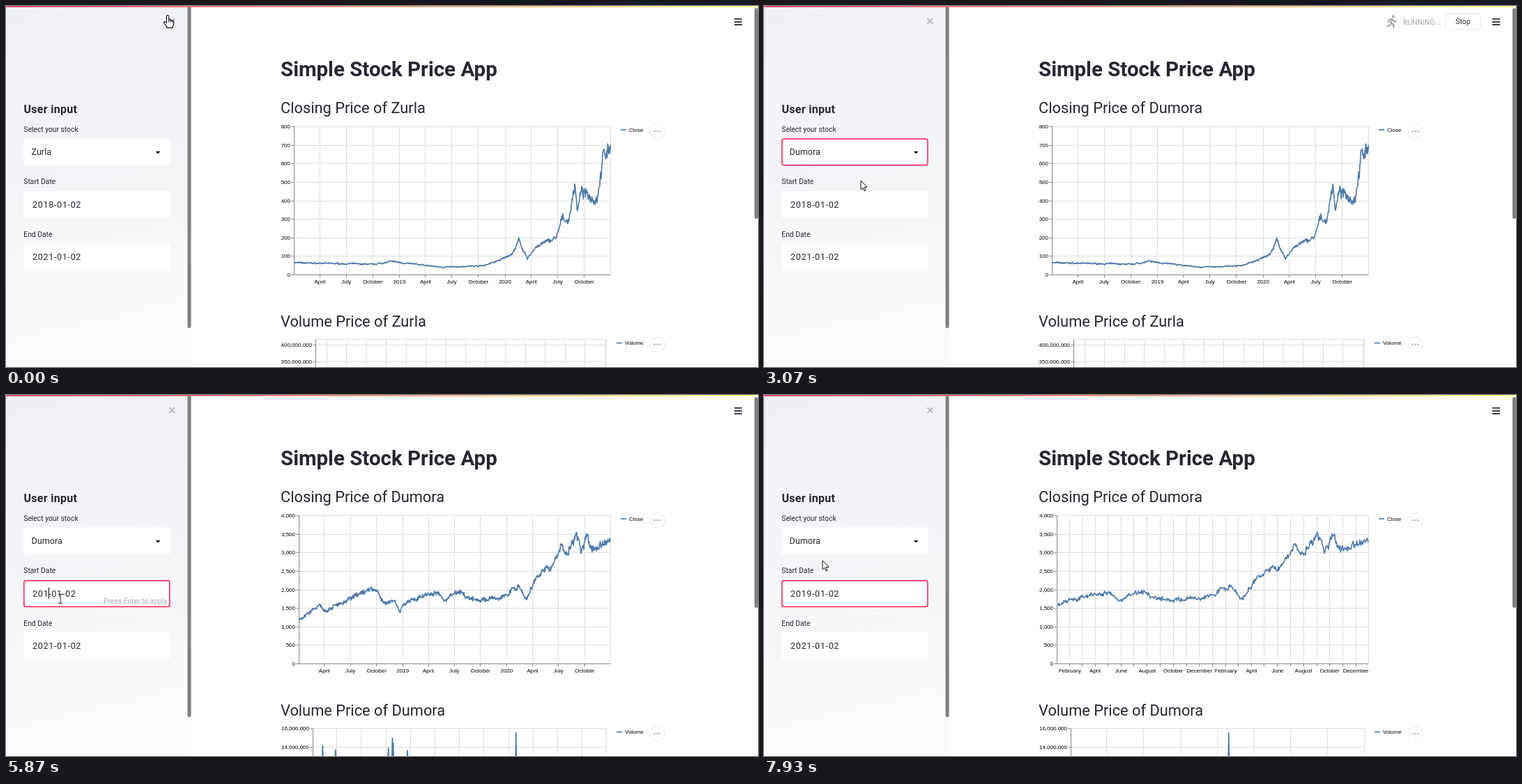
Animation of 1079x519 px, one loop 8 s. Source, as an HTML page:

```html
<!DOCTYPE html>
<html lang="en">
<head>
<meta charset="utf-8">
<title>Simple Stock Price App</title>
<style>
  html, body { margin: 0; width: 100%; height: 100%; overflow: hidden; background: #fff; }
  svg { display: block; width: 1079px; height: 519px; }
  text { font-family: Roboto, "Noto Sans", sans-serif; fill: #262730; white-space: pre; }
  .h1 { font-size: 29.5px; font-weight: 700; }
  .h2 { font-size: 21.8px; }
  .side { font-size: 16px; font-weight: 700; letter-spacing: .3px; }
  .label { font-size: 10.3px; }
  .value { font-size: 12.6px; }
  .date { font-size: 12.6px; letter-spacing: .65px; }
  .item { font-size: 12.6px; fill: #8b8c92; }
  .hint { font-size: 10.25px; fill: #a6aab5; }
  .axis { font: 8px "Liberation Sans", Arial, sans-serif; fill: #000; }
  .grid { stroke: #ddd; fill: none; }
  .rule { stroke: #888; fill: none; }
  .line { stroke: #4c78a8; fill: none; stroke-width: 1.6; stroke-linejoin: round; }
  .focus { stroke: #f63366; fill: none; stroke-width: 1.7; }
  .sport { stroke: #a3a4a8; fill: none; stroke-width: 2.1; stroke-linecap: round; stroke-linejoin: round; }
  .sport circle { fill: #a3a4a8; stroke: none; }
</style>
</head>
<body>
<svg viewBox="0 0 1079 519" xmlns="http://www.w3.org/2000/svg">
  <defs>
    <linearGradient id="sideFill" x2="0.12" y2="1">
      <stop stop-color="#eef0f5"/><stop offset="1" stop-color="#fbfbfb"/>
    </linearGradient>
    <linearGradient id="topFill"><stop stop-color="#f63366"/><stop offset="1" stop-color="#fffd80"/></linearGradient>
    <filter id="shadow" x="-10%" y="-10%" width="120%" height="125%">
      <feDropShadow dx="0" dy="2.5" stdDeviation="3.5" flood-color="#000" flood-opacity=".2"/>
    </filter>
  </defs>

  <rect width="1079" height="519" fill="#fff"/>
  <rect width="265.5" height="519" fill="url(#sideFill)"/>
  <rect x="260.5" y="-4" width="5" height="467" rx="2.5" fill="#7f7f80"/>
  <rect x="1074" y="3" width="5" height="303" rx="2.5" fill="#7f7f80"/>
  <rect width="1079" height="1.7" fill="url(#topFill)"/>
  <path d="M234.4 18l7.8 7.8m0-7.8l-7.8 7.8" stroke="#b9bbc1" stroke-width="2.1"/>
  <path d="M1045 18.7h11M1045 22.8h11M1045 26.9h11" stroke="#262730" stroke-width="1.7"/>

  <text class="side" x="25.5" y="154">User input</text>
  <text class="label" x="25.3" y="181">Select your stock</text>
  <text class="label" x="25.3" y="256">Start Date</text>
  <text class="label" x="25.3" y="332">End Date</text>
  <g fill="#fff">
    <rect x="25" y="190.3" width="210.5" height="39" rx="3"/>
    <rect x="25" y="266" width="210.5" height="39" rx="3"/>
    <rect x="25" y="341.3" width="210.5" height="39" rx="3"/>
  </g>
  <rect id="pickFocus" class="focus" x="25.8" y="191.2" width="209" height="37.6" rx="3"/>
  <rect id="dateFocus" class="focus" x="25.8" y="266.8" width="209" height="37.6" rx="3"/>
  <path d="M214.8 209h6.4l-3.2 3.4z" fill="#000"/>
  <text id="pick" class="value" x="36.5" y="214"></text>
  <text id="start" class="date" x="38" y="290"></text>
  <text class="date" x="38" y="365">2021-01-02</text>
  <text id="hint" class="hint" x="231" y="300" text-anchor="end">Press Enter to apply</text>
  <rect id="caret" width="1" height="16" fill="#000"/>

  <text class="h1" x="394" y="101">Simple Stock Price App</text>
  <text id="closeHead" class="h2" x="394" y="154"></text>
  <text id="volumeHead" class="h2" x="394" y="461"></text>
  <g id="closeCharts"></g>
  <g id="volumeCharts"></g>

  <g id="running">
    <g id="runner" class="sport">
      <circle cx="903" cy="15" r="2.1"/>
      <path d="M901 18.5l-1.6 6 3.6 2 .6 4.4M899.5 25l-1.7 3-3.6 1.2M901 18.6l-4 1.4-1.2 3M902 19.5l1.8 2.4 3 .6"/>
    </g>
    <g id="swimmer" class="sport">
      <circle cx="906" cy="19.3" r="2.1"/>
      <path d="M894.5 15.2l5-.3 4.5 7.2M899.5 18.6l-4 3.8"/>
      <path d="M892.8 25.2q2.7-2 5.4 0t5.4 0 5.4 0M892.8 29q2.7-2 5.4 0t5.4 0 5.4 0" stroke-width="1.6"/>
    </g>
    <text x="917" y="27" font-size="10.4" style="fill:#a3a4a8">RUNNING...</text>
    <rect x="978" y="10.5" width="50" height="23.5" rx="3" fill="#fff" stroke="#e4e5ea"/>
    <text x="1003" y="26" font-size="10.5" text-anchor="middle">Stop</text>
  </g>

  <g id="menu">
    <rect x="25" y="229" width="210.5" height="139" rx="2" fill="#fff" filter="url(#shadow)"/>
  </g>

  <g id="cursor">
    <path id="hand" fill="#fff" stroke="#111" stroke-width="1.1" stroke-linejoin="round"
      d="M-1.6 1.4Q0-.8 1.6 1.4V7Q3.3 5.9 4.2 7.4 5.6 6.5 6.6 8 8.4 7.4 8.7 9.4V13.2L7.2 16.4V18.4H-1.4V16.6L-5.4 11.4Q-6 9.4-4.1 9.3L-1.6 11.6ZM1.6 7v3M4.2 7.6v2.6M6.6 8.2v2.4"/>
    <path id="arrow" fill="#fff" stroke="#111" stroke-linejoin="round" d="M0 0V13L3 10.2 5 15 7 14.1 5 9.4H9Z"/>
    <path id="beam" fill="none" stroke="#222" d="M-3-6.5h2L0-5.8 1-6.5h2M0-5.8V5.8M-3 6.5h2L0 5.8 1 6.5h2"/>
  </g>
</svg>
<script>
const $ = id => document.getElementById(id);
const clamp = v => Math.max(0, Math.min(1, v));
const FIRST = "Zurla", SECOND = "Dumora";
const DAYS = 1094, RIGHT = 867.5, BASE = 386.5, TOP = 173.5;
const DAY_MS = 864e5, ORIGIN = Date.UTC(2018, 0, 2);

function random(seed) {
  return () => (seed = (seed * 16807) % 2147483647) / 2147483647;
}

// Trading days drift between key points [x on the three-year chart, price] with seeded jitter.
function prices(x0, noise, seed, keys) {
  const rnd = random(seed), out = [];
  let i = 0, drift = 0;
  for (let day = 0; day <= DAYS; day += 1.447) {
    const x = x0 + day / DAYS * (RIGHT - x0);
    while (i < keys.length - 2 && keys[i + 1][0] <= x) i++;
    const [[xa, va], [xb, vb]] = [keys[i], keys[i + 1]];
    const shock = (rnd() + rnd() - 1) * noise;
    drift = drift * .8 + shock * .6;
    out.push([day, (va + (vb - va) * (x - xa) / (xb - xa)) * (1 + drift + shock)]);
  }
  return out;
}

const firstPrices = prices(413.5, .05, 7, [
  [413.5, 65], [527, 57], [553, 72], [626, 41], [685, 50], [712, 84], [727, 116], [736, 185], [748, 85], [760, 150],
  [790, 203], [799, 315], [807, 280], [816.5, 495], [820, 350], [825, 440], [848, 410], [857, 640], [867.5, 700]]);
const secondPrices = prices(420.5, .028, 21, [
  [420.5, 1190], [451, 1590], [457, 1410], [519, 2010], [531, 1990], [541, 1680], [558, 1690], [565, 1400], [574, 1660],
  [619, 1930], [631, 1730], [649, 2000], [662, 1790], [708, 1750], [736, 2140], [747, 1720], [761, 2370], [785, 2650],
  [795, 3130], [806, 3030], [818.5, 3500], [825, 3000], [833.5, 3380], [843, 3080], [867.5, 3300]]);

const path = (cls, d) => `<path class="${cls}" d="${d}"/>`;
const label = (x, y, s, anchor = "start") => `<text class="axis" x="${x}" y="${y}" text-anchor="${anchor}">${s}</text>`;
const half = v => Math.floor(v) + .5;

function legend(x, y, name) {
  const dots = [-4, 0, 4].map(d => `<circle cx="${934.5 + d}" cy="${y + 2.2}" r="1.4" fill="#c0c0c0"/>`).join("");
  return path("line", `M${x} ${y}h8`) + label(x + 12, y + 2.5, name) +
    `<circle cx="934.5" cy="${y + 2.2}" r="10.6" fill="#fff" stroke="#e8e8e8"/>` + dots;
}

// First days of months inside the range, every `step` months.
function monthStarts(from, step) {
  const list = [];
  for (let m = step; ; m += step) {
    const date = new Date(Date.UTC(2018, m, 1)), day = (date - ORIGIN) / DAY_MS;
    if (day > DAYS) return list;
    if (day > from) list.push({ day, date });
  }
}

function monthName(date, step) {
  const month = date.getUTCMonth();
  if (step === 1 && month % 2 === 0) return "";
  return month ? date.toLocaleString("en-US", { month: "long", timeZone: "UTC" }) : date.getUTCFullYear();
}

function closeChart(series, x0, gap, from, step) {
  const px = day => x0 + (day - from) / (DAYS - from) * (RIGHT - x0);
  const py = v => BASE - v / (8 * gap) * (BASE - TOP);
  let grid = `M${x0} ${TOP}H${RIGHT}V${BASE}`, ticks = `M${x0} ${TOP}V${BASE}H${RIGHT}`, text = "";
  for (let v = 0; v <= 8 * gap; v += gap) {
    const y = half(py(v));
    grid += `M${x0} ${y}H${RIGHT}`;
    ticks += `M${x0} ${y}h-4`;
    text += label(x0 - 5.5, y + 2.8, v.toLocaleString("en-US"), "end");
  }
  for (const { day, date } of monthStarts(from, step)) {
    const x = half(px(day));
    grid += `M${x} ${TOP}V${BASE}`;
    ticks += `M${x} ${BASE}v4`;
    text += label(px(day), 399, monthName(date, step), "middle");
  }
  const curve = series.filter(p => p[0] >= from).map(([d, v]) => px(d).toFixed(1) + " " + py(v).toFixed(1)).join("L");
  return `<g>${path("grid", grid)}${path("rule", ticks)}${text}${path("line", "M" + curve)}${legend(882, 178, "Close")}</g>`;
}

function volumeChart(x0, top, gap, rows, columns, peaks) {
  let grid = `M${x0} 519V479.5H861.5V519`, ticks = `M${x0} 479.5V519`, text = "";
  rows.forEach((name, i) => {
    const y = half(top + i * gap);
    grid += `M${x0} ${y}H861.5`;
    ticks += `M${x0} ${y}h-4`;
    text += label(x0 - 5.5, y + 2.8, name, "end");
  });
  for (const x of columns) grid += `M${half(x)} 479.5V519`;
  const bars = peaks.map(([x, y]) => `M${x - .6} 522L${x} ${y}L${x + .6} 522`).join("");
  return `<g>${path("grid", grid)}${path("rule", ticks)}${text}${path("line", bars)}${legend(876, 484.5, "Volume")}</g>`;
}

function secondVolume(from) {
  const px = day => 440.5 + (day - from) / (DAYS - from) * 421;
  const peaks = [[36, 504], [84, 510], [281, 507], [296, 493], [299, 500], [352, 511], [757, 485.5]];
  return volumeChart(440.5, 479, 27, ["16,000,000", "14,000,000"],
    monthStarts(from, 3).map(m => px(m.day)),
    peaks.filter(p => p[0] > from).map(([d, y]) => [px(d), y]));
}

$("closeCharts").innerHTML = closeChart(firstPrices, 413.5, 100, 0, 3) +
  closeChart(secondPrices, 420.5, 500, 0, 3) + closeChart(secondPrices, 420.5, 500, 365, 1);
$("volumeCharts").innerHTML =
  volumeChart(444.5, 487, 24.5, ["400,000,000", "350,000,000"], Array.from({ length: 15 }, (_, i) => 460 + i * 28.5), []) +
  secondVolume(0) + secondVolume(365);
$("menu").innerHTML += [SECOND, "Bondeo", "Nedvo", FIRST]
  .map((s, i) => `<text class="item" x="38" y="${256 + i * 31.6}">${s}</text>`).join("");

// Time is counted in ticks, 15 per second.
const TICKS = 120;
const AT = { open: 20, choose: 44, rerun: 46, close1: 61, volume1: 63, done1: 65,
  focus: 72, erase: 88, retype: 94, enter: 102, close2: 107, volume2: 112, done2: 118 };

// Each leg eases the pointer to a place: start, end, x, y, shape.
const LEGS = [
  [0, 0, 232, 13, "hand"], [3, 10, 381, 118, "arrow"], [10, 14, 205, 208, "arrow"], [14, 16, 214, 212, "hand"],
  [21, 30, 139, 251, "hand"], [AT.choose, AT.choose, 139, 251, "arrow"], [52, 55, 142, 270, "beam"],
  [59, 66, 68, 285, "beam"], [73, 77, 78, 293, "beam"], [114, 119, 84, 238, "arrow"]];

const show = (el, on) => { el.style.display = on ? "" : "none"; };
const fade = (el, v) => { el.style.opacity = v; };
const write = (id, s) => { if ($(id).textContent !== s) $(id).textContent = s; };
const pickOne = (id, n) => [...$(id).children].forEach((el, i) => show(el, i === n));
const phase = (k, a, b) => k < a ? 0 : k < b ? 1 : 2;
const stale = (k, from) => 1 - .67 * clamp((k - from) / 15) ** 2;

function moveCursor(k) {
  const i = LEGS.findLastIndex(leg => k >= leg[0]);
  const [a, b, x, y, shape] = LEGS[i], [, , x1, y1] = LEGS[Math.max(0, i - 1)];
  const p = b > a ? clamp((k - a) / (b - a)) : 1, e = p * p * (3 - 2 * p);
  $("cursor").setAttribute("transform", `translate(${x1 + (x - x1) * e} ${y1 + (y - y1) * e})`);
  for (const id of ["hand", "arrow", "beam"]) show($(id), id === shape);
}

// The text caret blinks every 8 ticks and restarts with each edit.
function moveCaret(k) {
  const inDate = k >= AT.focus;
  const since = k - [AT.open, AT.focus, AT.erase, AT.retype].findLast((t, i) => k >= t || i === 0);
  const active = k >= AT.open && k < AT.choose || inDate;
  const typed = k >= AT.erase && k < AT.retype ? 3 : 4;
  show($("caret"), active && Math.floor(since / 8) % 2 === 0);
  $("caret").setAttribute("x", inDate ? Math.floor(38 + typed * 7.7) : 68);
  $("caret").setAttribute("y", inDate ? 277 : 202);
}

function render(k) {
  moveCursor(k);
  moveCaret(k);
  write("pick", k < AT.choose ? FIRST : SECOND);
  write("closeHead", "Closing Price of " + (k < AT.rerun ? FIRST : SECOND));
  write("volumeHead", "Volume Price of " + (k < AT.volume1 ? FIRST : SECOND));
  write("start", k < AT.erase ? "2018-01-02" : k < AT.retype ? "201-01-02" : "2019-01-02");
  show($("hint"), k >= AT.erase && k < AT.enter);

  const opened = clamp((k - AT.open + 1) / 3);
  fade($("menu"), Math.min(opened, clamp((AT.choose - k) / 2)));
  fade($("pickFocus"), Math.min(opened, clamp((AT.focus + 3 - k) / 4)));
  fade($("dateFocus"), clamp((k - AT.focus + 1) / 3));

  const shown = phase(k, AT.volume1, AT.volume2);
  pickOne("closeCharts", phase(k, AT.close1, AT.close2));
  pickOne("volumeCharts", shown);
  fade($("closeCharts"), k < AT.close1 ? stale(k, 50) : 1);
  const dim = [stale(k, 50), stale(k, 106), 1][shown];
  fade($("volumeCharts"), dim);
  fade($("volumeHead"), dim);

  const since = k - (k < AT.enter ? AT.rerun : AT.enter);
  show($("running"), k >= AT.rerun && k < AT.done1 || k >= AT.enter && k < AT.done2);
  show($("runner"), since < 9);
  show($("swimmer"), since >= 9);
}

const began = performance.now();
let last = -1;
function frame() {
  const k = Math.floor((performance.now() - began) * 15 / 1000 + .06) % TICKS;
  if (k !== last) render(last = k);
  requestAnimationFrame(frame);
}
frame();
</script>
</body>
</html>
```
